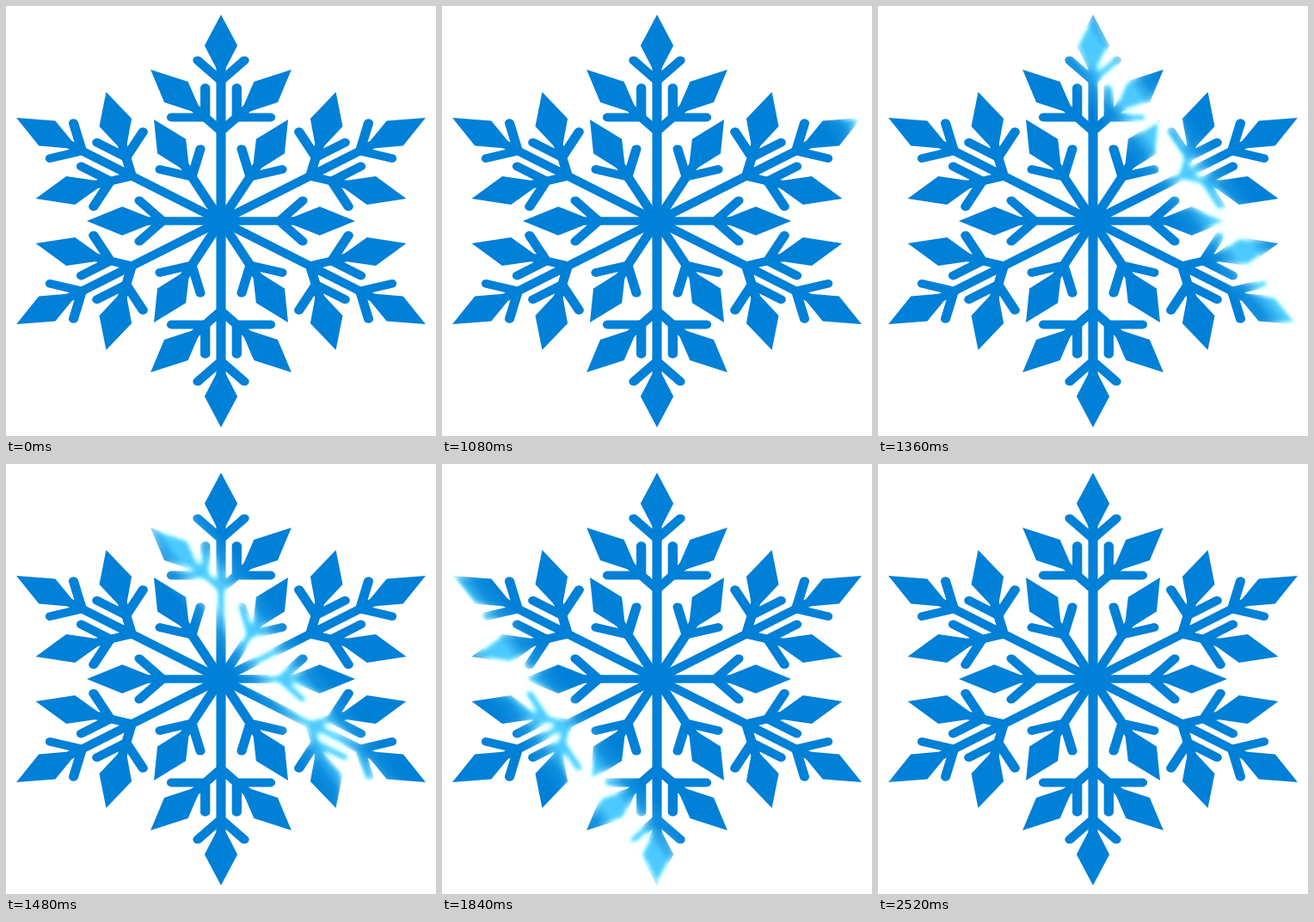
An HTML page for the animation above (4120 ms loop, 500 by 500 pixels).

```html
<!DOCTYPE html>
<html lang="en">
<head>
<meta charset="utf-8">
<title>Snowflake</title>
<style>
  html, body { margin: 0; width: 100%; height: 100%; overflow: hidden; background: #fff; }
  svg { display: block; width: 100vw; height: 100vh; }
</style>
</head>
<body>
<svg viewBox="0 0 500 500">
  <defs>
    <!-- a leaf with two ticks, origin where the ticks meet -->
    <g id="sprig">
      <path d="M0-77L16.7-41L0-4L-16.7-41Z" stroke="none"/>
      <path d="M-23.7-23.7L0 0L23.7-23.7" fill="none"/>
    </g>
    <g id="arm">
      <path d="M0 0V-180M0-104.5L31-135.5M0-104.5L-31-135.5" fill="none"/>
      <use href="#sprig" y="-163"/>
      <use href="#sprig" transform="translate(16 -120.5) rotate(45) scale(1.02)"/>
      <use href="#sprig" transform="translate(-16 -120.5) rotate(-45) scale(1.02)"/>
      <g transform="rotate(30)">
        <path d="M0 0V-75" fill="none"/>
        <use href="#sprig" y="-59.3"/>
      </g>
    </g>
    <g id="flake" transform="translate(250 250) scale(1.1447 1)" fill="#0080d7"
       stroke="#0080d7" stroke-width="9.7" stroke-linecap="round"></g>

    <!-- recolours by depth inside the shape: white rim, cyan core -->
    <filter id="shine" filterUnits="userSpaceOnUse" x="0" y="0" width="500" height="500"
            color-interpolation-filters="sRGB">
      <feGaussianBlur in="SourceAlpha" stdDeviation="3"/>
      <feColorMatrix values="0 0 0 1 0  0 0 0 1 0  0 0 0 1 0  0 0 0 0 1"/>
      <feComponentTransfer>
        <feFuncR type="table" tableValues="1 .98 .88 .6 .3"/>
        <feFuncG type="table" tableValues="1 1 .99 .93 .79"/>
        <feFuncB type="table" tableValues="1 1 1 1 1"/>
      </feComponentTransfer>
    </filter>
    <linearGradient id="fade">
      <stop offset="0" stop-color="#fff" stop-opacity="0"/>
      <stop offset=".2" stop-color="#fff" stop-opacity=".22"/>
      <stop offset=".4" stop-color="#fff"/>
      <stop offset=".6" stop-color="#fff"/>
      <stop offset=".8" stop-color="#fff" stop-opacity=".22"/>
      <stop offset="1" stop-color="#fff" stop-opacity="0"/>
    </linearGradient>
    <mask id="band" maskUnits="userSpaceOnUse" x="0" y="0" width="500" height="500">
      <rect id="beam" x="-45" y="-800" width="90" height="1600" fill="url(#fade)"/>
    </mask>
  </defs>
  <use href="#flake"/>
  <g id="glint" mask="url(#band)">
    <g filter="url(#shine)"><use href="#flake"/></g>
  </g>
</svg>
<script>
  const LOOP = 4120, STEP = 40, START = 1080, END = 2160;
  const FROM = -315, TO = 245;
  const get = id => document.getElementById(id);
  const flake = get('flake'), beam = get('beam'), glint = get('glint');

  for (let i = 0; i < 6; i++) {
    const arm = document.createElementNS('http://www.w3.org/2000/svg', 'use');
    arm.setAttribute('href', '#arm');
    arm.setAttribute('transform', `rotate(${i * 60})`);
    flake.append(arm);
  }

  function draw(ms) {
    const t = Math.floor(ms % LOOP / STEP) * STEP;
    const progress = (Math.min(t, END) - START) / (END - START);
    glint.setAttribute('visibility', t < START ? 'hidden' : 'visible');
    beam.setAttribute('transform', `rotate(143.13) translate(${FROM + (TO - FROM) * progress} 0)`);
  }

  let start;
  function tick(now) {
    start ??= now;
    draw(now - start);
    requestAnimationFrame(tick);
  }
  draw(0);
  requestAnimationFrame(tick);
</script>
</body>
</html>
```
